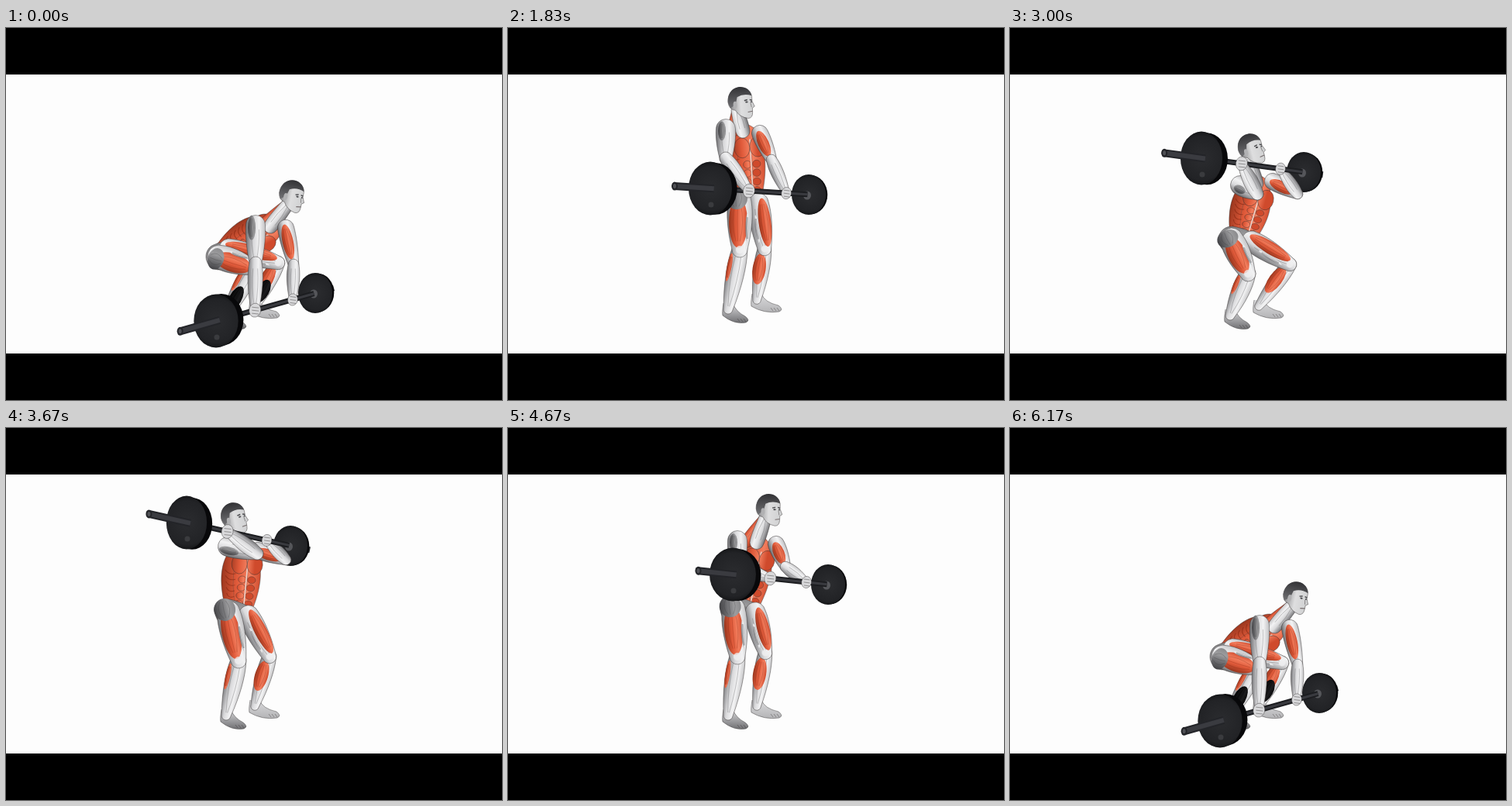
These frames come from a looping animation (640 by 480 pixels, 6340 ms). An HTML page with a canvas:

```html
<!DOCTYPE html>
<html lang="en">
<head>
<meta charset="utf-8">
<title>Barbell clean</title>
<style>
  html, body { margin: 0; width: 100%; height: 100%; overflow: hidden; background: #000; }
  canvas { display: block; width: 640px; height: 480px; }
</style>
</head>
<body>
<canvas id="stage" width="640" height="480"></canvas>
<script>
(() => {
const ctx = document.getElementById("stage").getContext("2d");
const LOOP = 6340, STEP = 500 / 3, LAST = 37;

const SKIN = ["#c4c4c6", "#f3f3f4", "#dadadc", "#747477"];
const GREY = ["#8a8a8c", "#9d9d9f", "#727275", "#424245"];
const RED = ["#cf4a2c", "#f27e5e", "#e05a3a", "#96341c"];
const DARK = ["#0c0c0d", "#19191b", "#0c0c0d", "#060607"];
const LINE = "rgba(50,46,46,.55)";

// plates, head, shoulders, elbows, hips, knees (near x,y then far x,y), head tilt, heel lift
const floor = [272,378, 400,342, 368,217, 322,254, 361,258, 322,303, 371,305, 275,295, 288,285, 318,309, 351,303, 12, 0];
const pull = [248,304, 378,287, 346,150, 312,195, 347,193, 303,242, 349,242, 265,246, 292,250, 285,294, 325,292, 3, 0];
const extend = [262,207, 389,215, 300,97, 281,130, 325,136, 281,168, 340,170, 299,224, 323,226, 299,286, 331,285, -3, 8];
const squat = [248,168, 380,186, 311,157, 297,203, 339,198, 319,214, 371,214, 286,273, 312,275, 307,317, 361,305, -14, 0];
const rise = [234,122, 368,152, 294,117, 286,153, 325,158, 324,162, 361,170, 287,238, 313,242, 300,300, 340,295, -10, 0];
const curl = [291,189, 414,202, 336,106, 296,145, 346,150, 296,180, 358,179, 291,234, 319,238, 296,295, 332,290, 2, 0];

const blend = (a, b, t) => a.map((v, i) => v + (b[i] - v) * t);
const turn = blend(curl, squat, .4);
const rack = rise.map((v, i) => i > 13 ? extend[i] : i % 2 ? v - 21 : v + 3);
const low = floor.map((v, i) => i === 5 ? v + 2 : v);

const keys = [[0, floor], [6, pull], [11, extend], [14, turn], [18, squat], [22, rise],
  [24, rack], [28, curl], [35, low], [37, low], [38, floor]];

// Monotone cubic between keys: smooth, no overshoot
function slope(k, i) {
  if (k < 0 || k >= keys.length - 1) return 0;
  return (keys[k + 1][1][i] - keys[k][1][i]) / (keys[k + 1][0] - keys[k][0]);
}
function tangent(k, i) {
  const a = slope(k - 1, i), b = slope(k, i);
  return a * b > 0 ? 2 * a * b / (a + b) : 0;
}
function poseAt(frame) {
  let k = 0;
  while (k < keys.length - 2 && keys[k + 1][0] <= frame) k++;
  const [f0, a] = keys[k], [f1, b] = keys[k + 1];
  const h = f1 - f0, t = (frame - f0) / h, u = 1 - t;
  return a.map((v, i) => v * (1 + 2 * t) * u * u + b[i] * t * t * (3 - 2 * t)
    + h * (tangent(k, i) * t * u * u - tangent(k + 1, i) * t * t * u));
}

const lerp = (a, b, t) => [a[0] + (b[0] - a[0]) * t, a[1] + (b[1] - a[1]) * t];

function along(a, b, draw) {
  const dx = b[0] - a[0], dy = b[1] - a[1];
  ctx.save();
  ctx.translate(a[0], a[1]);
  ctx.rotate(Math.atan2(dy, dx));
  draw(Math.hypot(dx, dy));
  ctx.restore();
}

function shade(w, pal) {
  const g = ctx.createLinearGradient(0, -w, 0, w);
  [0, .3, .6, 1].forEach((p, i) => g.addColorStop(p, pal[i]));
  return g;
}

function outline(fill, width = .8) {
  ctx.fillStyle = fill;
  ctx.fill();
  ctx.strokeStyle = LINE;
  ctx.lineWidth = width;
  ctx.stroke();
}

// Rounded limb with half widths at start, belly and end
function tube(a, b, w0, w1, w2, pal = SKIN) {
  along(a, b, len => {
    ctx.beginPath();
    ctx.moveTo(0, -w0);
    ctx.bezierCurveTo(len * .25, -w1 * 1.1, len * .6, -w1, len, -w2);
    ctx.arc(len, 0, w2, -Math.PI / 2, Math.PI / 2);
    ctx.bezierCurveTo(len * .6, w1, len * .25, w1 * 1.1, 0, w0);
    ctx.arc(0, 0, w0, Math.PI / 2, -Math.PI / 2);
    outline(shade(w1, pal));
    ctx.beginPath();
    for (const s of [-.35, .4]) {
      ctx.moveTo(len * .12, s * w0);
      ctx.quadraticCurveTo(len * .5, s * w1 * 1.3, len * .95, s * w2 * .4);
    }
    ctx.strokeStyle = "rgba(70,70,72,.35)";
    ctx.stroke();
  });
}

// Muscle belly between fractions t0 and t1 of a limb
function muscle(a, b, t0, t1, off, w, pal = RED) {
  along(a, b, len => {
    const r = len * (t1 - t0) / 2;
    ctx.translate(len * (t0 + t1) / 2, off);
    ctx.beginPath();
    ctx.ellipse(0, 0, r, w, 0, 0, 7);
    ctx.fillStyle = shade(w, pal);
    ctx.fill();
    ctx.beginPath();
    for (const s of [-.5, .1, .6]) {
      ctx.moveTo(-r * .75, s * w * .5);
      ctx.quadraticCurveTo(0, s * w * 1.4, r * .75, s * w * .4);
    }
    ctx.strokeStyle = pal === RED ? "rgba(120,30,10,.3)" : "rgba(50,50,52,.3)";
    ctx.lineWidth = .8;
    ctx.stroke();
  });
}

function stroke(a, b, width, color) {
  ctx.beginPath();
  ctx.moveTo(...a);
  ctx.lineTo(...b);
  ctx.lineWidth = width;
  ctx.strokeStyle = color;
  ctx.stroke();
}

function disc([x, y], rx, ry, fill) {
  ctx.beginPath();
  ctx.ellipse(x, y, rx, ry, 0, 0, 7);
  ctx.fillStyle = fill;
  ctx.fill();
}

function foot([x, y], length, drop) {
  ctx.beginPath();
  ctx.moveTo(x - 6, y - 8);
  ctx.quadraticCurveTo(x - 8, y + 4, x - 7, y + 8);
  ctx.quadraticCurveTo(x + length * .3, y + drop + 6, x + length - 3, y + drop + 3);
  ctx.quadraticCurveTo(x + length + 3, y + drop, x + length - 4, y + drop - 5);
  ctx.quadraticCurveTo(x + 10, y + 3, x + 6, y - 8);
  const g = ctx.createLinearGradient(x, y - 8, x, y + drop + 5);
  g.addColorStop(0, SKIN[2]);
  g.addColorStop(1, length < 30 ? "#6a6a6d" : "#b2b2b4");
  outline(g);
  for (let i = 0; i < 3; i++) {
    stroke([x + length - 3 - i * 4, y + drop + 2], [x + length - 6 - i * 4, y + drop - 2], .7, LINE);
  }
}

function leg(hip, knee, ankle, far, crouch) {
  const s = far ? .88 : 1;
  foot(ankle, far ? 32 : 26, far ? 12 : 14);
  tube(knee, ankle, 10 * s, 12 * s, 6 * s);
  if (far) muscle(knee, ankle, .1, .7, 3, 8.5);
  else muscle(knee, ankle, .08, .55, 9, 3);
  if (crouch > 0) {
    ctx.globalAlpha = crouch;
    muscle(knee, ankle, .4, .9, 0, 8, DARK);
    ctx.globalAlpha = 1;
  }
  tube(hip, knee, 15 * s, 16 * s, 10 * s);
  muscle(hip, knee, -.1, .96, far ? -5 : 2, far ? 8 : 12);
  muscle(hip, knee, .25, .85, far ? 6 : -10, 2.5, SKIN);
  disc(knee, 5 * s, 5 * s, "rgba(240,240,241,.75)");
}

function torso(shN, shF, hipN, hipF) {
  const neck = lerp(shN, shF, .5), hips = lerp(hipN, hipF, .5);
  const chest = lerp(neck, hips, .12);
  tube(chest, hips, 20, 26, 15, RED);
  along(chest, hips, len => {
    // obliques and ribs
    ctx.strokeStyle = "rgba(120,30,10,.5)";
    ctx.lineWidth = 1;
    ctx.beginPath();
    for (let i = 0; i < 6; i++) {
      const x = len * (.25 + i * .1);
      ctx.moveTo(x, 21 - i);
      ctx.quadraticCurveTo(x + 7, 15, x + 4, 7);
    }
    ctx.stroke();
    // abdominals
    for (let i = 0; i < 4; i++) {
      for (const y of [-14, -2]) {
        ctx.beginPath();
        ctx.ellipse(len * (.4 + i * .14), y + i * .8, len * .06, 5.2, 0, 0, 7);
        outline(shade(9, RED), .7);
      }
    }
    ctx.beginPath();
    ctx.moveTo(0, -8);
    ctx.lineTo(len * .9, -6);
    ctx.strokeStyle = "#ecd2c8";
    ctx.lineWidth = 1.6;
    ctx.stroke();
    // pectorals
    for (const y of [-17, 3]) {
      ctx.beginPath();
      ctx.ellipse(len * .13, y, 13, 10, 0, 0, 7);
      outline(shade(17, RED));
    }
  });
}

function head([x, y], tilt) {
  ctx.save();
  ctx.translate(x, y);
  ctx.rotate(tilt * Math.PI / 180);
  ctx.beginPath();
  ctx.moveTo(-16, -2);
  ctx.bezierCurveTo(-16, -25, 12, -25, 15, -8);
  ctx.lineTo(15, -2);
  ctx.lineTo(18, 5);
  ctx.lineTo(15, 7);
  ctx.lineTo(15, 12);
  ctx.quadraticCurveTo(15, 20, 9, 20);
  ctx.quadraticCurveTo(-2, 18, -7, 9);
  ctx.quadraticCurveTo(-15, 8, -16, -2);
  const g = ctx.createLinearGradient(-14, 0, 18, 0);
  g.addColorStop(0, "#8a8a8c");
  g.addColorStop(.45, "#dededf");
  g.addColorStop(1, "#cecfd0");
  outline(g);
  ctx.beginPath();
  ctx.moveTo(-16, -1);
  ctx.bezierCurveTo(-17, -26, 12, -26, 15, -9);
  ctx.quadraticCurveTo(5, -13, -4, -8);
  ctx.lineTo(-6, 0);
  ctx.quadraticCurveTo(-11, 5, -13, 6);
  const hair = ctx.createLinearGradient(0, -20, 0, 8);
  hair.addColorStop(0, "#343437");
  hair.addColorStop(1, "#757578");
  ctx.fillStyle = hair;
  ctx.fill();
  disc([-7, 2], 2.5, 4.5, "#b1b1b3");
  stroke([5, -3], [9, -4], 1.4, "#48484b");
  stroke([12, -4], [15, -3], 1.4, "#48484b");
  disc([8, -1], 1.7, 1, "#48484b");
  disc([14, -1], 1, 1, "#48484b");
  stroke([13, 0], [14, 6], .8, LINE);
  stroke([9, 12], [15, 11], 1.1, "#756c6c");
  ctx.restore();
}

function arm(sh, el, hand, far) {
  const s = far ? .85 : 1;
  tube(sh, el, 12.5 * s, 12 * s, 8 * s);
  if (far) muscle(sh, el, -.1, .85, 1, 7);
  else muscle(sh, el, -.25, .4, 5, 5, GREY);
  tube(el, hand, 8 * s, 10 * s, 5 * s);
}

function grip([x, y], s) {
  ctx.beginPath();
  ctx.ellipse(x, y, 7.5 * s, 9 * s, .2, 0, 7);
  outline("#d9d9db");
  for (let i = -1; i < 2; i++) {
    stroke([x - 4 * s, y + i * 4], [x + 5 * s, y + i * 4 + 1], .8, LINE);
  }
}

function plate([x, y], back, rx, ry) {
  disc(back, rx, ry * .97, "#08080a");
  const g = ctx.createRadialGradient(x, y, 3, x, y, ry);
  g.addColorStop(0, "#2a2b2e");
  g.addColorStop(.8, "#222326");
  g.addColorStop(1, "#151618");
  disc([x - 1, y], rx, ry, g);
}

function draw(frame) {
  const p = poseAt(frame);
  const [near, far, skull, shN, shF, elN, elF, hipN, hipF, knN, knF, [tilt, lift]] =
    Array.from({ length: 12 }, (_, i) => [p[2 * i], p[2 * i + 1]]);
  const bar = t => lerp(near, far, t);
  const handN = bar(.385), handF = bar(.765);
  const crouch = Math.max(0, Math.min(1, (skull[1] - 175) / 35));

  ctx.fillStyle = "#000";
  ctx.fillRect(0, 0, 640, 480);
  ctx.fillStyle = "#fdfdfd";
  ctx.fillRect(0, 60, 640, 360);

  stroke(far, bar(1.18), 8, "#2a2b2e");
  plate(far, bar(1.01), 22, 26);
  disc([far[0] - 3, far[1] + 1], 5, 5.5, "#55565a");

  torso(shN, shF, hipN, hipF);
  tube(hipN, hipF, 17, 15, 11, GREY);
  leg(hipF, knF, [321, 359 - lift], true, crouch);
  leg(hipN, knN, [284, 371 - lift], false, crouch);
  muscle(hipN, knN, -.3, .16, 4, 14, GREY);

  const neck = lerp(shN, shF, .5), nape = [skull[0] - 4, skull[1] + 10];
  tube(lerp(shN, neck, .5), nape, 8, 8, 7, RED);
  tube(neck, nape, 9, 9, 8);
  head(skull, tilt);

  arm(shF, elF, handF, true);
  stroke(bar(.1), bar(.98), 7, "#1c1d20");
  stroke(bar(.1), bar(.98), 3, "#393a3f");
  arm(shN, elN, handN, false);
  grip(handF, .85);
  grip(handN, 1);

  plate(near, bar(.045), 28 + (near[0] - 262) / 15, 34.5);
  disc([near[0], near[1] + 21], 3.5, 3.5, "#3a3b3e");
  const end = bar(-.37);
  stroke(end, bar(.03), 10, "#232428");
  stroke(end, bar(.03), 6, "#3a3b40");
  disc(end, 4, 5.5, "#232428");
  disc(end, 2, 3, "#505156");
}

let shown = -1;
function tick() {
  const t = performance.now() % LOOP;
  const frame = Math.min(LAST, Math.floor((t + 4) / STEP));
  if (frame !== shown) draw(shown = frame);
  requestAnimationFrame(tick);
}
tick();
})();
</script>
</body>
</html>
```
